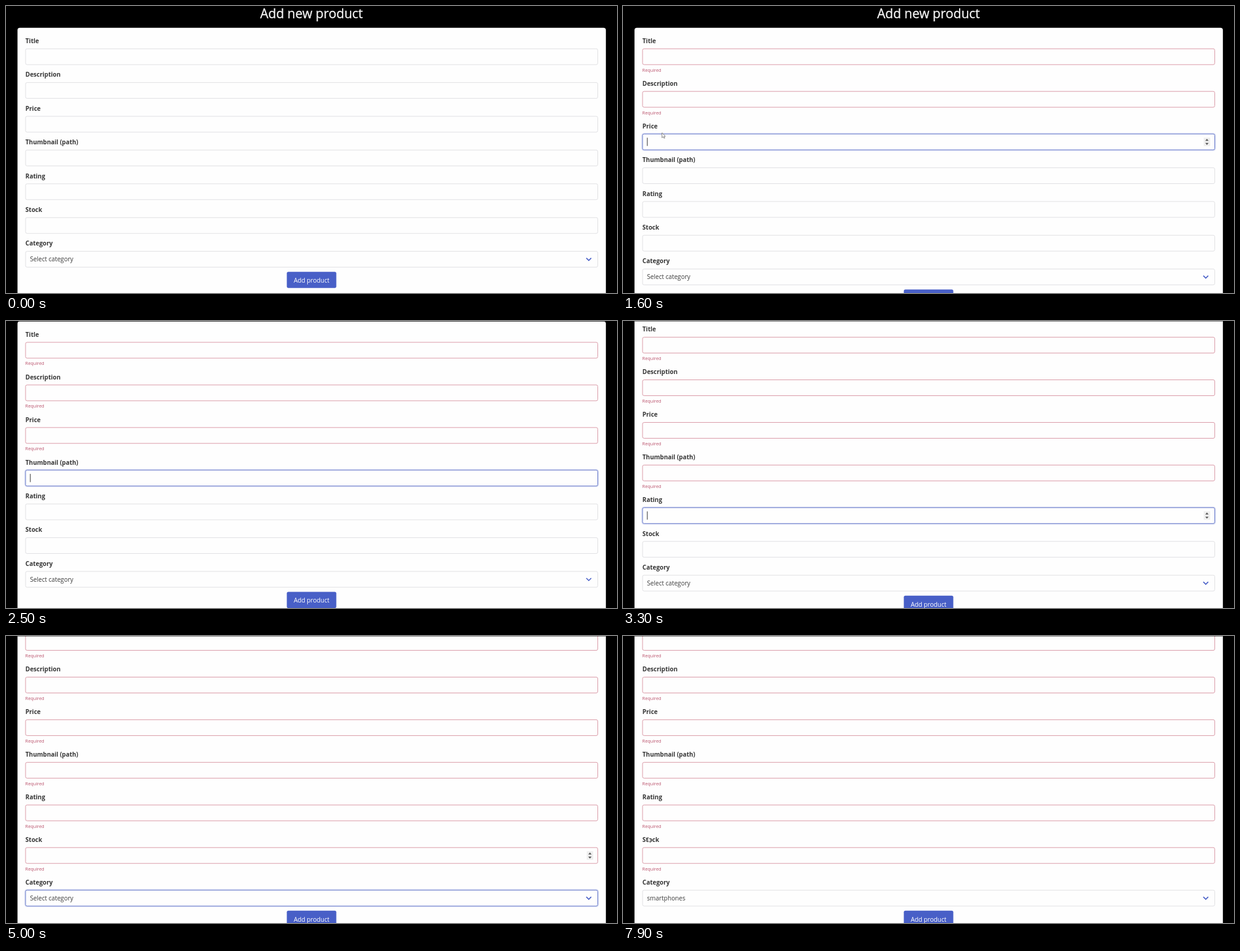
Write an HTML page that moves like this. It is 1000x471 px and loops after 8 s.

```html
<!DOCTYPE html>
<html lang="en">
<head>
<meta charset="utf-8">
<title>Add new product</title>
<style>
  html, body { margin: 0; width: 100%; height: 100%; overflow: hidden; background: #000; }
  svg { display: block; width: 100vw; height: 100vh; font-family: "Open Sans", "Noto Sans", sans-serif; }
  .heading { font-size: 21.1px; fill: #f4f4f4; stroke: #f4f4f4; stroke-width: .35; text-anchor: middle; }
  .label { font-size: 10px; font-weight: 700; fill: #363636; }
  .value { font-size: 10.1px; fill: #3c3c3c; }
  .error { font-size: 7.35px; fill: #b9506a; }
  .button { font-size: 10.1px; fill: #fff; text-anchor: middle; }
</style>
</head>
<body>
<svg id="stage" viewBox="0 0 1000 471">
  <rect width="1000" height="471"/>
  <g id="page">
    <text class="heading" x="500" y="20.3">Add new product</text>
    <rect x="18.8" y="35.7" width="963" height="600" rx="4" fill="#fefefe"/>
  </g>
  <rect x="18.8" width="963" height="1" fill="#000" opacity=".5"/>
  <path id="pointer" d="M0 0V8.2L2 6.5L3.4 9.2L4.6 8.6L3.3 6H5.6Z" fill="#fff" stroke="#666" stroke-width=".8"/>
</svg>
<script>
const NS = "http://www.w3.org/2000/svg";
const LOOP = 8000, PITCH = 55.4, ERROR_H = 14.53;
const BLUE = "#485fc7", FOCUS = "#6376c9", INVALID = "#da9aa7", IDLE = "#e0e0e3";
const page = document.getElementById("page");
const pointer = document.getElementById("pointer");

function add(parent, tag, attrs, text) {
  const el = document.createElementNS(NS, tag);
  for (const k in attrs) el.setAttribute(k, attrs[k]);
  if (text) el.textContent = text;
  parent.appendChild(el);
  return el;
}
const show = (el, on) => el.setAttribute("visibility", on ? "visible" : "hidden");
const moveTo = (el, x, y) => el.setAttribute("transform", `translate(${x} ${y})`);

// name, focus time, blur time, time the number spinner hides
const fields = [
  ["Title", 600, 1100],
  ["Description", 1100, 1600],
  ["Price", 1600, 2100, 2100],
  ["Thumbnail (path)", 2100, 3000],
  ["Rating", 3000, 3800, 3800],
  ["Stock", 3800, 5000, 5500],
  ["Category", 5000, 7600]
].map(([name, focus, blur, spinEnd]) => {
  const g = add(page, "g", {});
  add(g, "text", { class: "label", x: 31.8, y: 61 }, name);
  const glow = add(g, "rect", { x: 31.2, y: 69.4, width: 938.1, height: 27.6, rx: 3.2,
    fill: "none", stroke: BLUE, "stroke-opacity": .18, "stroke-width": 2 });
  const box = add(g, "rect", { x: 32, y: 70.2, width: 936.5, height: 26, rx: 2.5, fill: "#fefefe" });
  const f = { g, glow, box, focus, blur, spinEnd };
  if (name === "Category") {
    f.value = add(g, "text", { class: "value", x: 39.3, y: 87 });
    add(g, "path", { d: "M949.8 81.2L953.8 85.2L957.8 81.2", fill: "none", stroke: BLUE, "stroke-width": 1.6 });
  } else {
    f.error = add(g, "text", { class: "error", x: 31.6, y: 107.6 }, "Required");
    f.caret = add(g, "rect", { x: 39.3, y: 76.3, width: 1, height: 13.5, fill: "#333" });
  }
  if (spinEnd) {
    f.spin = add(g, "g", {});
    add(f.spin, "rect", { x: 950.5, y: 76.2, width: 10.5, height: 14, fill: "#efefef" });
    add(f.spin, "path", { d: "M953 81.4L955.7 78.2L958.4 81.4ZM953 85L955.7 88.2L958.4 85Z", fill: "#555" });
  }
  return f;
});

const button = add(page, "g", {});
add(button, "rect", { x: 459.6, y: 436.2, width: 81, height: 26.5, rx: 2.6, fill: BLUE });
add(button, "text", { class: "button", x: 500.1, y: 454 }, "Add product");

function scrollAt(t) {
  if (t < 2400) return 0;
  if (t < 2600) return 3 * ERROR_H * (1 - (1 - (t - 2300) / 300) ** 1.5);
  return ERROR_H * (t < 3800 ? 3 : t < 5000 ? 4 : 5);
}

// start, end, hide time, from point, to point
const moves = [
  [1600, 1800, 1800, 63.8, 208, 63.8, 216],
  [3800, 4000, 4000, 70.5, 356, 70.5, 366],
  [7000, 7800, LOOP, 49.8, 129, 40.8, 330]
];

function movePointer(t) {
  const m = moves.find(([start, , hide]) => t >= start && t < hide);
  show(pointer, m);
  if (!m) return;
  const [start, end, , x0, y0, x1, y1] = m;
  const k = Math.min(1, (t - start) / (end - start));
  const e = k * k * (3 - 2 * k);
  moveTo(pointer, x0 + (x1 - x0) * e, y0 + (y1 - y0) * e);
}

function draw(time) {
  const t = Math.floor(time % LOOP / 100) * 100;
  let shift = 0;
  fields.forEach((f, i) => {
    const focused = t >= f.focus && t < f.blur;
    const invalid = f.error && t >= f.blur;
    moveTo(f.g, 0, i * PITCH + shift);
    f.box.setAttribute("stroke", focused ? FOCUS : invalid ? INVALID : IDLE);
    show(f.glow, focused);
    if (f.error) {
      show(f.error, invalid);
      show(f.caret, focused && (t - f.focus) % 1000 < 500);
    } else {
      f.value.textContent = t < 7000 ? "Select category" : "smartphones";
    }
    if (f.spin) show(f.spin, t >= f.focus && t < f.spinEnd);
    if (invalid) shift += ERROR_H;
  });
  moveTo(button, 0, shift);
  moveTo(page, 0, -scrollAt(t));
  movePointer(t);
}

function tick(now) {
  draw(now);
  requestAnimationFrame(tick);
}
draw(0);
requestAnimationFrame(tick);
</script>
</body>
</html>
```
